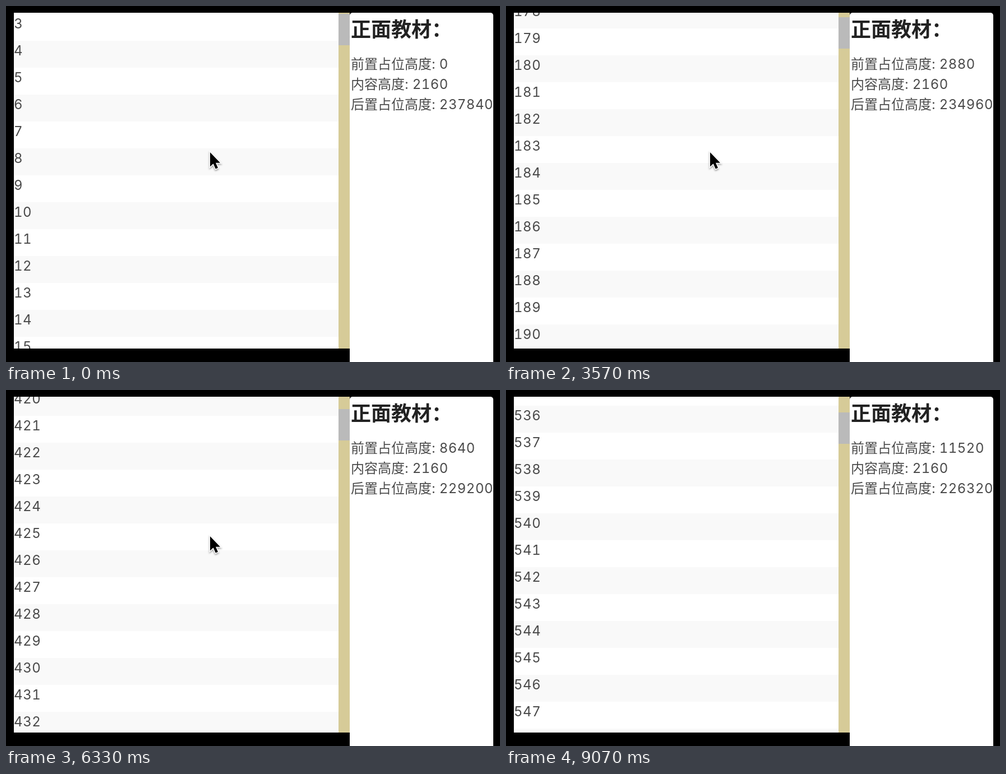
An HTML page for the animation above (9.43 s loop, 881 by 635 pixels).

```html
<!DOCTYPE html>
<html lang="zh-CN">
<head>
<meta charset="utf-8">
<title>虚拟滚动列表</title>
<style>
  html, body { margin: 0; width: 100%; height: 100%; overflow: hidden; background: #000; }
  body {
    position: relative;
    color: #4a4a4a;
    font: 24px/36px Inter, "Noto Sans CJK SC", sans-serif;
  }
  .list, .track, .thumb, .panel, .cursor, .row { position: absolute; }
  .list { left: 14px; top: 12px; width: 579px; height: 599px; overflow: hidden; background: #fff; }
  .row { left: 0; top: 0; width: 100%; height: 48px; }
  .row.even { background: #f9f9f9; }
  .row, .num { letter-spacing: .5px; font-variant-numeric: tabular-nums; }
  .track { left: 593px; top: 12px; width: 20px; height: 599px; background: #d6cb98; }
  .thumb { left: 0; top: 0; width: 20px; height: 56px; background: #bababa; }
  .panel { left: 613px; top: 12px; width: 256px; height: 623px; border-radius: 5px 5px 0 0; background: #fff; }
  .panel h1, .panel p { position: absolute; left: 2px; margin: 0; white-space: nowrap; }
  .panel h1 { top: 12px; color: #222; font-size: 36px; font-weight: 700; }
  .panel p { top: 74px; }
  .cursor { left: 356px; top: 254px; filter: drop-shadow(0 2px 1.5px rgba(0, 0, 0, .35)); }
</style>
</head>
<body>
<div class="list"></div>
<div class="track"><div class="thumb"></div></div>
<div class="panel">
  <h1>正面教材：</h1>
  <p>前置占位高度: <span class="num" id="before">0</span><br>
     内容高度: <span class="num">2160</span><br>
     后置占位高度: <span class="num" id="after">237840</span></p>
</div>
<svg class="cursor" width="36" height="46">
  <path d="M8 7V32.5L13.7 27.2L17.8 36.5L22 34.7L18 25.7H26Z"
        fill="#000" stroke="#fff" stroke-width="3" paint-order="stroke"/>
</svg>
<script>
const LOOP = 9430, ROW = 48, VIEW = 599, THUMB = 56, PAGE = 1440;
const TOTAL = 480000, CURSOR_GONE = 7900;

// time in ms, scroll distance in px
const keys = [
  [140, 94], [1330, 1814], [2570, 5596], [4570, 11772],
  [6330, 20126], [7570, 25400], [8070, 25664]
];

const $ = s => document.querySelector(s);
const list = $('.list'), thumb = $('.thumb'), cursor = $('.cursor');
const before = $('#before'), after = $('#after');

const rows = Array.from({ length: 14 }, () => {
  const row = document.createElement('div');
  list.append(row);
  return row;
});

// monotone cubic slopes, at rest at both ends
const rate = i => (keys[i + 1][1] - keys[i][1]) / (keys[i + 1][0] - keys[i][0]);
const slopes = keys.map((_, i) => {
  if (i === 0 || i === keys.length - 1) return 0;
  const a = rate(i - 1), b = rate(i);
  return 2 * a * b / (a + b);
});

function scrollAt(t) {
  const last = keys.length - 1;
  if (t <= keys[0][0]) return keys[0][1];
  if (t >= keys[last][0]) return keys[last][1];
  const i = keys.findIndex(k => k[0] > t) - 1;
  const [t0, y0] = keys[i], [t1, y1] = keys[i + 1];
  const h = t1 - t0, u = (t - t0) / h, v = 1 - u;
  return y0 * (1 + 2 * u) * v * v + y1 * u * u * (3 - 2 * u)
    + h * u * v * (slopes[i] * v - slopes[i + 1] * u);
}

function draw(now) {
  // 30 pictures a second, on a 10 ms clock
  const step = Math.floor((now % LOOP + 5) * .03);
  const t = Math.round(step * 10 / 3) * 10;
  const scroll = 2 * Math.round(scrollAt(t) / 2);

  const first = Math.floor(scroll / ROW);
  rows.forEach((row, i) => {
    const n = first + i + 1;
    row.textContent = n;
    row.className = n % 2 ? 'row' : 'row even';
    row.style.transform = `translateY(${(n - 1) * ROW - scroll}px)`;
  });

  const travel = scroll / (TOTAL - VIEW) * (VIEW - THUMB);
  thumb.style.transform = `translateY(${Math.max(2, 2 * Math.floor(travel / 2))}px)`;

  const front = Math.max(0, Math.floor(scroll / PAGE) - 1) * PAGE / 2;
  before.textContent = front;
  after.textContent = TOTAL / 2 - 2160 - front;
  cursor.style.visibility = t < CURSOR_GONE ? 'visible' : 'hidden';
}

const start = performance.now();
function tick() {
  draw(performance.now() - start);
  requestAnimationFrame(tick);
}
tick();
</script>
</body>
</html>
```
